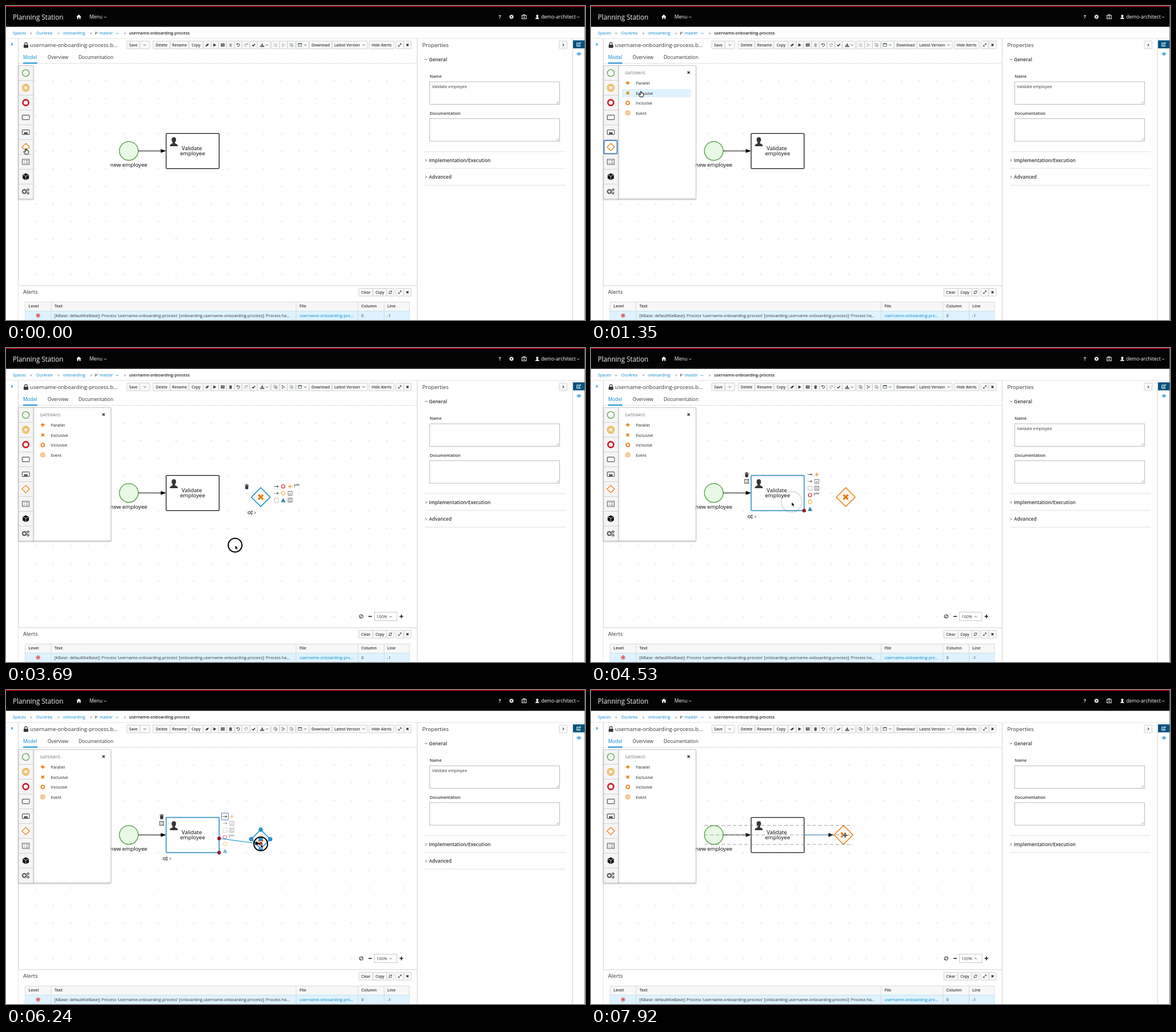
Recreate the animation shown at these times as an HTML page. Size 1016 by 551 pixels, loop 8 s.

```html
<!DOCTYPE html>
<html lang="en">
<head>
<meta charset="utf-8">
<title>Process editor</title>
<style>
html, body { margin: 0; width: 100%; height: 100%; overflow: hidden; background: #fff; }
svg { display: block; width: 1016px; height: 551px; font-family: "Open Sans", sans-serif; }
</style>
</head>
<body>
<svg id="stage" viewBox="0 0 1016 551" xmlns="http://www.w3.org/2000/svg"></svg>
<script>
const BLUE = '#0088ce', ORANGE = '#ec7a08', GREEN = '#4f9a3d', RED = '#c9252d', DARK = '#363636', GREY = '#d1d1d1';
const LOOP = 8000;

// drawing helpers
const text = (x, y, s, size = 7.2, fill = DARK, weight = 400, anchor = 'start') =>
  `<text x="${x}" y="${y + size * .36}" font-size="${size}" fill="${fill}" font-weight="${weight}" text-anchor="${anchor}">${s}</text>`;
const rect = (x, y, w, h, fill = 'none', stroke = 'none', sw = 1, extra = '') =>
  `<rect x="${x}" y="${y}" width="${w}" height="${h}" fill="${fill}" stroke="${stroke}" stroke-width="${sw}" ${extra}/>`;
const circle = (x, y, r, fill = 'none', stroke = 'none', sw = 1, extra = '') =>
  `<circle cx="${x}" cy="${y}" r="${r}" fill="${fill}" stroke="${stroke}" stroke-width="${sw}" ${extra}/>`;
const line = (x1, y1, x2, y2, stroke = GREY, sw = 1, extra = '') =>
  `<path d="M${x1} ${y1}L${x2} ${y2}" stroke="${stroke}" stroke-width="${sw}" fill="none" ${extra}/>`;
const at = (x, y, d, stroke = DARK, sw = 1, fill = 'none', extra = '') =>
  `<path transform="translate(${x} ${y})" d="${d}" stroke="${stroke}" stroke-width="${sw}" fill="${fill}" ${extra}/>`;
const solid = (x, y, d, fill = DARK) => at(x, y, d, 'none', 0, fill);

// icons, all centred on x, y
const chevs = { d: 'M-2-1L0 1L2-1', u: 'M-2 1L0-1L2 1', r: 'M-1-2L1 0L-1 2' };
const chev = (x, y, dir, c = DARK, sw = .9) => at(x, y, chevs[dir], c, sw);
const cross = (x, y, r, c, sw) => at(x, y, `M${-r} ${-r}L${r} ${r}M${r} ${-r}L${-r} ${r}`, c, sw);
const plus = (x, y, r, c, sw) => at(x, y, `M${-r} 0H${r}M0 ${-r}V${r}`, c, sw);
const gear = (x, y, r, c, sw = 1.3) => circle(x, y, r, 'none', c, sw) +
  circle(x, y, r + sw * .7, 'none', c, sw, `stroke-dasharray="${r * .48} ${r * .48}"`);
const gears = (x, y, k = 1, c = DARK) => gear(x - 2 * k, y, 2.4 * k, c, k) + gear(x + 3.2 * k, y - 2.4 * k, 1.1 * k, c, .8 * k) + gear(x + 3.2 * k, y + 2.4 * k, 1.1 * k, c, .8 * k);
const trash = (x, y, c, k = 1) => `<g transform="translate(${x} ${y}) scale(${k})">` +
  solid(0, 0, 'M-2.7-1.8H2.7L2.2 3.8H-2.2ZM-3.3-3H3.3V-2.2H-3.3ZM-1.2-4H1.2V-3H-1.2Z', c) + '</g>';
const person = (x, y, k, c) => `<g transform="translate(${x} ${y}) scale(${k})">` +
  solid(0, 0, 'M0-4C3-4 2.5 0 1.2 1V2C2 3 4 2.5 4 5H-4C-4 2.5-2 3-1.2 2V1C-2.5 0-3-4 0-4Z', c) + '</g>';
const refresh = (x, y, c) => at(x, y, 'M-2.3-.4A2.4 2.4 0 0 1 2-1.4M2.3 .4A2.4 2.4 0 0 1-2 1.4M2.4-2.8V-.9H.6M-2.4 2.8V.9H-.6', c, .9);
const undo = (x, y, c, flip = 1) => `<g transform="translate(${x} ${y}) scale(${flip} 1)">` +
  at(0, 0, 'M-2-1.4A2.4 2.4 0 1 1-1.6 1.7M-2.6-2.8V-.8H-.6', c, 1) + '</g>';
const expand = (x, y) => at(x, y, 'M-2.2 2.2L2.2-2.2M.2-2.4H2.4V-.2M-.2 2.4H-2.4V.2', DARK, .9);
const sheets = (x, y, c) => at(x, y, 'M-2.6-2.8H.8V1H-2.6ZM-.8 1V2.8H2.6V-1H.8', c, .7);
const form = (x, y, w, h) => rect(x - w / 2, y - h / 2, w, h, '#fff', DARK, .9) +
  at(x, y, `M${-w * .3} ${-h * .2}H${-w * .15}M0 ${-h * .2}H${w * .32}M${-w * .3} ${h * .2}H${-w * .15}M0 ${h * .2}H${w * .32}`, DARK, .9);
const arrow = (x, y, dash = '') => line(x - 4, y, x + 2, y, DARK, .9, dash && 'stroke-dasharray="1 .7"') + solid(x, y, 'M1.3-2L4 0L1.3 2Z');
const box = (x, y, mark) => rect(x - 3.5, y - 3.5, 7, 7, '#fff', '#555', .8) + at(x, y, mark, '#555', .8);
const note = (x, y) => at(x, y, 'M-3.5 3V-2H-2M-3.5-.5H5M-1-2H5', '#555', .8);
const handle = (x, y) => circle(x, y, 2.9, '#a51d25', '#6d1016', .7);
const magnet = (x, y) => circle(x, y, 3.4, '#2a94d6', '#1878b4', .7);
const button = (x, w, label = '', y = 61.5) => rect(x, y, w, 13.5, '#fafafa', '#c4c4c4', .8, 'rx=".8"') +
  (label ? text(x + w / 2, y + 6.9, label, 6.6, DARK, 600, 'middle') : '');

function header() {
  const seps = [44, 92, 149.5, 208.5].map(x => text(x, 47.5, '»', 7.2, '#666', 400, 'middle')).join('');
  return rect(0, 0, 1016, 36.5, '#030303') + rect(0, 0, 1016, 1.4, '#c00') +
    text(12, 19.3, 'Planning Station', 11.7, '#f5f5f5') +
    solid(127.8, 19, 'M0-4L4.3 0H3V3.7H.9V1H-.9V3.7H-3V0H-4.3Z', '#fff') +
    text(146.5, 18.8, 'Menu', 8.4, '#fff') + chev(174, 19.5, 'd', '#fff') +
    text(866.5, 19, '?', 8.6, '#fff', 700, 'middle') + gear(887, 19, 2, '#fff', 1.6) +
    rect(905.5, 16.5, 7.5, 6, 'none', '#fff', 1) + at(909.2, 19, 'M-1.5-2.5V-4H1.5V-2.5M-1.6 .6H1.6M0-1V2.2', '#fff', .9) +
    person(932.3, 18.6, .85, '#fff') + text(939, 18.8, 'demo-architect', 8.6, '#fff') + chev(1004, 19.5, 'd', '#fff') +
    text(12, 47.5, 'Spaces', 7.2, BLUE) + text(53, 47.5, 'OurArea', 7.2, BLUE) + text(100, 47.5, 'onboarding', 7.2, BLUE) +
    at(158.6, 47.5, 'M-1.4-2.4V2.6M1.6-2.2V-1C1.6 .5-1.4 .2-1.4 1.5', DARK, .9) + text(164, 47.5, 'master', 7.2, BLUE) +
    chev(195, 48, 'd', BLUE, .8) + seps + text(216, 47.5, 'username-onboarding-process', 7.2, '#222', 600);
}

function toolbar() {
  const items = [[212, 23, 'Save'], [235, 17], [258, 30, 'Delete'], [288, 33, 'Rename'], [321, 25, 'Copy'], [346, 14],
    [360, 13], [373, 14], [387, 14], [401, 13], [414, 14], [428, 13], [441, 23], [466, 14], [480, 14], [494, 14],
    [509, 23], [532, 40, 'Download'], [572, 62], [637, 44, 'Hide Alerts'], [684, 14], [698, 13]];
  const y = 68.4;
  return items.map(([x, w, s]) => button(x, w, s)).join('') +
    text(576, y, 'Latest Version', 6.6, DARK, 600) + chev(243.5, y, 'd') + chev(627.5, y, 'd') +
    solid(353, y, 'M-3.5 2L0-2H3.5L0 2Z') + solid(366, y, 'M-2.2-3L3 0L-2.2 3Z') +
    rect(377, 65.7, 6.6, 5.4, DARK) + at(380.3, y, 'M-1.1-3V3M1.1-3V3M-3.5-.9H3.5M-3.5 .9H3.5', '#fafafa', .4) +
    undo(407.5, y, DARK) + undo(421, y, '#999', -1) + at(434.5, y, 'M-2.6 0L-.8 1.8L2.7-1.8', '#222', 1.3) +
    at(449.5, y, 'M0-3V1M-1.8-.6L0 1.2L1.8-.6M-3 1V2.7H3V1', DARK, 1.1) + chev(458, y, 'd') +
    sheets(501, y, '#777') + rect(512.8, 65.8, 6, 5, '#fff', '#3c5a50', .8) + line(512.5, 66.5, 519, 66.5, '#3c5a50', 1.2) +
    chev(525, y, 'd') + expand(691, y) + cross(704.5, y, 1.8, '#222', 1.4);
}

function alerts() {
  const heads = [[39.5, 'Level'], [85, 'Text'], [515, 'File'], [623.5, 'Column'], [669, 'Line']];
  return rect(21.5, 490.8, 700, 61, '#fff') + line(21, 490.8, 721, 490.8) + text(30, 502, 'Alerts', 9.6) +
    button(619, 25, 'Clear', 495.5) + button(644, 24, 'Copy', 495.5) + button(668, 13, '', 495.5) + button(684, 14, '', 495.5) +
    button(698, 13, '', 495.5) + refresh(674.5, 502.3, DARK) + expand(691, 502.3) + cross(704.5, 502.3, 1.8, '#222', 1.4) +
    rect(33.5, 519.5, 674.5, 16, '#f7f7f7', GREY, .8) + rect(33.5, 535.5, 674.5, 18, '#def3ff', '#bee1f4', .8) +
    [79, 509, 617.5, 663.5].map(x => line(x, 519.5, x, 551, GREY, .8)).join('') +
    heads.map(([x, s]) => text(x, 526.8, s, 7.2, DARK, 600)).join('') +
    circle(56.3, 543.2, 3, '#fff', '#c00', .9) + circle(56.3, 543.2, 1.4, '#c00') +
    text(85, 543.2, "[KBase: defaultKieBase]: Process 'username-onboarding-process' [onboarding.username-onboarding-process]: Process ha...") +
    text(515, 543.2, 'username-onboarding-pro...', 7.2, BLUE) + text(623.5, 543.2, '0') + text(669, 543.2, '-1');
}

const section = (y, label) => chev(737, y + .1, 'r') + text(742.3, y, label, 8.4, DARK, 600) +
  line(735, y + 14.3, 982, y + 14.3, '#d8d8d8', .8);

function properties() {
  const area = y => rect(743.5, y, 228, 39.5, '#fff', '#aaa', .8) + at(970, y + 38, 'M0-4L-4 0M0-2L-2 0', '#777', .6);
  return text(730.5, 68.3, 'Properties', 9.6) + button(971, 13.5) + chev(977.8, 68.3, 'r', DARK, 1.1) +
    chev(737, 93.7, 'd') + text(742.3, 93.6, 'General', 8.4, DARK, 600) +
    text(743.5, 123.7, 'Name', 7.2, DARK, 600) + area(133) + text(743.5, 188.2, 'Documentation', 7.2, DARK, 600) + area(197.7) +
    line(735, 255.7, 982, 255.7, '#d8d8d8', .8) + section(270.7, 'Implementation/Execution') +
    line(721.5, 57, 721.5, 551) + line(994, 57, 994, 551) +
    rect(995, 60.3, 21, 14, '#00527f') + at(1005.3, 67.4, 'M1-2.4H-3.4V3H2V1M-1 1L3.6-3.4', '#fff', 1.1) +
    at(1005.3, 84, 'M-3.8 0Q0-4.4 3.8 0Q0 4.4-3.8 0Z', BLUE, .9) + circle(1005.3, 84, 1.5, BLUE) +
    line(1015.3, 1, 1015.3, 551, '#777', .9);
}

function diagram() {
  return rect(22, 101, 699, 390, 'url(#dots)') +
    circle(215.5, 254.3, 16.5, '#e8fae6', GREEN, 1.3) + text(215.5, 278.3, 'new employee', 9.6, '#000', 400, 'middle') +
    link(232, 254.3, 281, 254.3, '#000');
}

function frameLines() {
  return line(0, 57, 1016, 57, '#dcdcdc', .8) + line(21.5, 57, 21.5, 551) + chev(10.3, 67.3, 'r', BLUE, 1.3) +
    rect(31, 68, 8, 5.5, DARK, 'none', 0, 'rx=".8"') + at(35, 68, 'M-2.3 0V-1.5A2.3 2.3 0 0 1 2.3-1.5V0', DARK, 1.2) +
    text(42.3, 68.3, 'username-onboarding-process.b...', 9.6) +
    text(30, 90, 'Model', 8.4, BLUE) + text(73, 90, 'Overview', 8.4) + text(127.5, 90, 'Documentation', 8.4) +
    line(21.5, 100.7, 721, 100.7, '#d8d8d8', .8) + rect(30, 99.3, 25, 1.8, BLUE);
}

function palette(active) {
  const cy = i => 117.5 + 26 * i, x = 34.7;
  let s = rect(22, 104.7, 26, 234, '#f5f5f5', '#bbb', .8, 'filter="url(#shadow)"');
  for (let i = 1; i < 9; i++) s += line(22, 104.5 + 26 * i, 48, 104.5 + 26 * i, '#c8c8c8', .8);
  if (active) s += rect(22.8, 236, 23, 23, '#fff', '#2a6fb5', 1.6, 'rx="1"');
  return s + circle(x, cy(0), 6, '#f5fbf4', GREEN, 1.2) +
    circle(x, cy(1), 6, 'none', '#e9a21b', 1.3) + circle(x, cy(1), 3.6, 'none', '#e9a21b', 1.3) +
    circle(x, cy(2), 5, '#fff', RED, 2.8) + rect(28.5, 191.5, 12.5, 8, '#fff', DARK, 1, 'rx=".6"') +
    rect(28.5, 217.5, 12.5, 8, '#fff', DARK, 1, 'rx=".6"') + rect(31.5, 221.8, 6.5, 2.6, DARK) +
    at(x, cy(5), 'M0-6.5L6.5 0L0 6.5L-6.5 0Z', ORANGE, 1.2, '#fff') + form(x, cy(6), 12, 9) +
    solid(x, cy(7), 'M0-6L5.5-3.3V3.3L0 6L-5.5 3.3V-3.3Z', '#111') + at(x, cy(7), 'M-5-3L0-.6L5-3M0-.6V5.5', '#f5f5f5', .8) +
    gears(x, cy(8), 1.25);
}

function gatewayPanel(hover) {
  return rect(48, 104.7, 136, 233.5, '#fff', '#bbb', .8, 'filter="url(#shadow)"') +
    (hover >= 0 ? rect(55, 146.5 + 17.6 * (hover - 1), 119.5, 13.2, '#def3ff', '#cdeaf8', .6) : '') +
    text(59.5, 117.6, 'GATEWAYS', 7.2, '#777') + cross(171.3, 116.8, 2, '#222', 1.3) +
    ['Parallel', 'Exclusive', 'Inclusive', 'Event'].map((s, i) => text(78.7, 135.5 + 17.55 * i, s, 7.2, '#222')).join('') +
    plus(64.5, 135, 3.3, ORANGE, 1.9) + cross(64.5, 152.7, 2.4, ORANGE, 1.9) + circle(64.5, 170, 3, 'none', ORANGE, 1.7) +
    circle(64.5, 187.6, 3.9, 'none', ORANGE, .9) + circle(64.5, 187.6, 1.8, 'none', ORANGE, 1);
}

function link(x1, y1, x2, y2, color) {
  const a = Math.atan2(y2 - y1, x2 - x1), k = Math.hypot(x2 - x1, y2 - y1) - 8;
  return line(x1, y1, x1 + k * Math.cos(a), y1 + k * Math.sin(a), color, 1) +
    `<path transform="translate(${x2} ${y2}) rotate(${a * 180 / Math.PI})" d="M0 0L-9.5 3.4V-3.4Z" fill="#000"/>`;
}

function task(selected) {
  return rect(281, 223.6, 93, 61.8, '#fff', selected ? '#3b96c6' : '#111', selected ? 1.7 : 1.3, 'rx="1.5"') +
    person(294.5, 237.2, 1.75, DARK) + text(326, 249.3, 'Validate', 9.6, '#000', 400, 'middle') +
    text(327.4, 258.3, 'employee', 9.6, '#000', 400, 'middle');
}

const gateway = (g, color) => at(g.x, g.y, 'M0-16.6L16.6 0L0 16.6L-16.6 0Z', color, 1.4, '#fdf8f1') + cross(g.x, g.y, 4, ORANGE, 3.3);

function gatewayTools() {
  return trash(422.5, 243.5, DARK, 1.1) + arrow(474.5, 243) + circle(486.5, 243, 3, '#fff', RED, 1.2) + plus(498.5, 243, 3.3, '#e9a04a', 1.6) +
    note(510, 241.5) + arrow(474.5, 255, 1) + circle(486.5, 255, 3.3, '#fff', '#e9a21b', 1) + box(498.5, 255, 'M-1.2 1H1.2M0-.2V2.2') +
    rect(471, 263.7, 7, 7, '#fff', '#777', .7, 'stroke-dasharray="1.4 .7"') + solid(486.5, 267, 'M0-3.8L4 3.6H-4Z', '#2b8ba0') +
    box(498.5, 267, 'M-2 2L2-2M-2-1H0M0 2H2') + gears(428.5, 289, .85) + chev(437, 289, 'r');
}

function taskTools(tip, dim) {
  return trash(273.2, 222.5, DARK, 1.1) + form(273.2, 234, 7, 7) + gears(279.5, 296, .85) + chev(288.3, 296, 'r') +
    `<g opacity="${dim ? .6 : 1}">` + plus(396.3, 222, 3.3, '#e9a04a', 1.6) + arrow(384.3, 234, 1) + box(396.3, 234, 'M-1.2 1H1.2M0-.2V2.2') +
    rect(380.8, 242.5, 7, 7, '#fff', '#777', .7, 'stroke-dasharray="1.4 .7"') + box(396.3, 246, 'M-2 2L2-2M-2-1H0M0 2H2') +
    circle(384.3, 258, 3, '#fff', RED, 1.2) + note(395.5, 256.5) + circle(384.3, 270, 3.3, '#fff', '#e9a21b', 1) +
    solid(384.3, 282.3, 'M0-3.8L4 3.6H-4Z', '#2b8ba0') + '</g>' +
    (tip || dim ? rect(378.3, 216, 12, 12, '#fff', '#4a78b5', 1, 'rx=".8"') : '') + arrow(384.3, 222) +
    (tip ? rect(393, 215.2, 24.2, 13.8, '#393f44', 'none', 0, 'rx="1"') + text(405.1, 222, 'Create Sequence Flow', 2.2, '#fff', 600, 'middle') : '') +
    handle(374, 285.3);
}

function zoom() {
  return rect(615, 463, 88, 16, '#fff') + circle(623.3, 471, 3.2, 'none', '#222', 1) + line(621, 473.3, 625.6, 468.7, '#222') +
    line(636, 471, 642, 471, '#222', 1.6) + rect(646.5, 463.5, 39.5, 15, '#fff', '#bbb', .8) + text(650.5, 471.2, '100%', 7.2) +
    chev(675, 471.5, 'u') + plus(693.8, 471, 3.2, '#222', 1.6);
}

// timeline
const path = [[0, 35, 250], [400, 35, 250], [720, 62, 205], [870, 62, 205], [1330, 87.5, 149.5], [1500, 87.5, 149.5],
  [2260, 427, 247], [2310, 427, 247], [2700, 441, 256], [3120, 441, 256], [3620, 402, 346], [3900, 402, 346], [4230, 352, 270],
  [4680, 352, 270], [5340, 385, 223], [5490, 385, 223], [6180, 447, 270], [6930, 447, 270], [7130, 449, 263], [7250, 449, 263],
  [7600, 446, 255], [LOOP, 446, 255]];
const presses = [[30, 150], [1500, 1560], [3640, 3750], [4380, 4400], [5490, 5560], [6170, 6300]];
const FADE = 150;

function cursorAt(t) {
  const i = path.findIndex(p => p[0] > t), [t0, x0, y0] = path[i - 1], [t1, x1, y1] = path[i];
  const k = (t - t0) / (t1 - t0), e = k * k * (3 - 2 * k);
  return { x: x0 + (x1 - x0) * e, y: y0 + (y1 - y0) * e };
}

function ring(t, c) {
  const p = presses.find(([a, b]) => t >= a && t < b + FADE);
  if (!p) return '';
  const k = Math.max(0, (t - p[1]) / FADE);
  return circle(c.x, c.y, 12 + 7 * k, 'none', '#000', 2, `opacity="${1 - k}"`);
}

function pointer(kind, c) {
  if (kind === 'hand') return at(c.x, c.y, 'M-.9 .5Q0-.8 .9 .5V3.5L2 3.2L3 3.8L4 4L4.8 5V7.3L3.6 10H-1.5L-4 6.2Q-4 4.6-2.6 5.2L-.9 6.5Z', '#000', 1, '#fff', 'stroke-linejoin="round"');
  if (kind === 'move') {
    const d = 'M0-4.3L1.6-2.4H.6V-.6H2.4V-1.6L4.3 0L2.4 1.6V.6H.6V2.4H1.6L0 4.3L-1.6 2.4H-.6V.6H-2.4V1.6L-4.3 0L-2.4-1.6V-.6H-.6V-2.4H-1.6Z';
    return at(c.x, c.y, d, '#fff', 1.2) + solid(c.x, c.y, d, '#000');
  }
  return at(c.x, c.y, 'M0 0V8L1.9 6.3L3.2 9.2L4.6 8.6L3.4 5.8H5.9Z', '#fff', .9, '#000');
}

function draw(t) {
  const c = cursorAt(t);
  const open = t >= 180, active = open && t < 1560, carrying = t >= 1560 && t < 2700, placed = t >= 2700;
  const gwSel = placed && t < 3750, taskSel = t >= 4420 && t < 6330;
  const linking = t >= 5560 && t < 6300, joined = t >= 6300, moving = t >= 7250;
  const near = linking && Math.hypot(c.x - 447, c.y - 262) < 28;
  const g = moving ? { x: c.x - 3, y: c.y - .7 } : { x: 447, y: 261.7 };
  const tip = t >= 5300 && t < 5560, linkProps = t >= 6720;
  const edgeY = p => 254.3 + (p.y - 254.3) * 47 / (p.x - 327);
  let s = task(taskSel);

  if (joined) {
    const dx = 327 - g.x, dy = 254.3 - g.y, k = 16.8 / (Math.abs(dx) + Math.abs(dy));
    s += link(374, edgeY(g), g.x + dx * k, g.y + dy * k, BLUE);
  }
  if (placed) s += gateway(g, gwSel || near ? BLUE : ORANGE);
  if (moving && Math.abs(g.y - 254.3) < .8)
    s += [237.6, 254.3, 271].map(y => line(199, y, 460, y, '#888', .8, 'stroke-dasharray="6 4"')).join('');
  if (gwSel) s += gatewayTools();
  if (taskSel) s += taskTools(tip, linking || joined);
  if (near) s += [[0, 0], [0, -16.7], [16.7, 0], [0, 16.7], [-16.7, 0]].map(([x, y]) => magnet(g.x + x, g.y + y)).join('');
  if (linking) s += link(374, edgeY(c), c.x, c.y, BLUE) + handle(374, edgeY(c)) + handle(c.x, c.y);
  if (placed) s += zoom();

  const row = Math.floor((c.y - 128.9) / 17.6);
  const hover = active && c.x > 55 && c.x < 175 && row >= 0 && row < 4 ? row : -1;
  if (open) s += gatewayPanel(hover);
  s += palette(active);

  const enabled = placed ? '#555' : '#aaa';
  s += trash(394, 68.6, enabled, .85) + sheets(473, 68.4, enabled) +
    at(487, 68.4, 'M-2-2L2.6 1.6M-2 2L2.6-1.6', enabled, .8) + circle(485, 66.4, .9, 'none', enabled, .7) + circle(485, 70.4, .9, 'none', enabled, .7);
  if (t < 2730 || (t >= 4480 && !linkProps)) s += text(747.5, 141.3, 'Validate employee');
  if (!linkProps) s += section(300.1, 'Advanced');

  if (carrying) s += cross(c.x + 5, c.y + 5.8, 3, ORANGE, 2.6);
  const hand = t < 400 || hover >= 0 || tip;
  s += ring(t, c) + pointer(hand ? 'hand' : t >= 7000 ? 'move' : 'arrow', c);
  layer.innerHTML = s;
}

const stage = document.getElementById('stage');
stage.innerHTML = `<defs>
  <pattern id="dots" x="36.6" y="116.4" width="30.8" height="30.8" patternUnits="userSpaceOnUse"><circle cx="15.4" cy="15.4" r=".75" fill="#b5b5b5"/></pattern>
  <filter id="shadow" x="-10%" y="-5%" width="120%" height="110%"><feDropShadow dx="0" dy="1" stdDeviation="1.2" flood-opacity=".3"/></filter>
  </defs>` + rect(0, 0, 1016, 551, '#fff') + diagram() + header() + frameLines() + toolbar() + alerts() + properties() + '<g id="layer"></g>';
const layer = document.getElementById('layer');

const start = performance.now();
function tick() {
  draw((performance.now() - start) % LOOP);
  requestAnimationFrame(tick);
}
tick();
</script>
</body>
</html>
```
